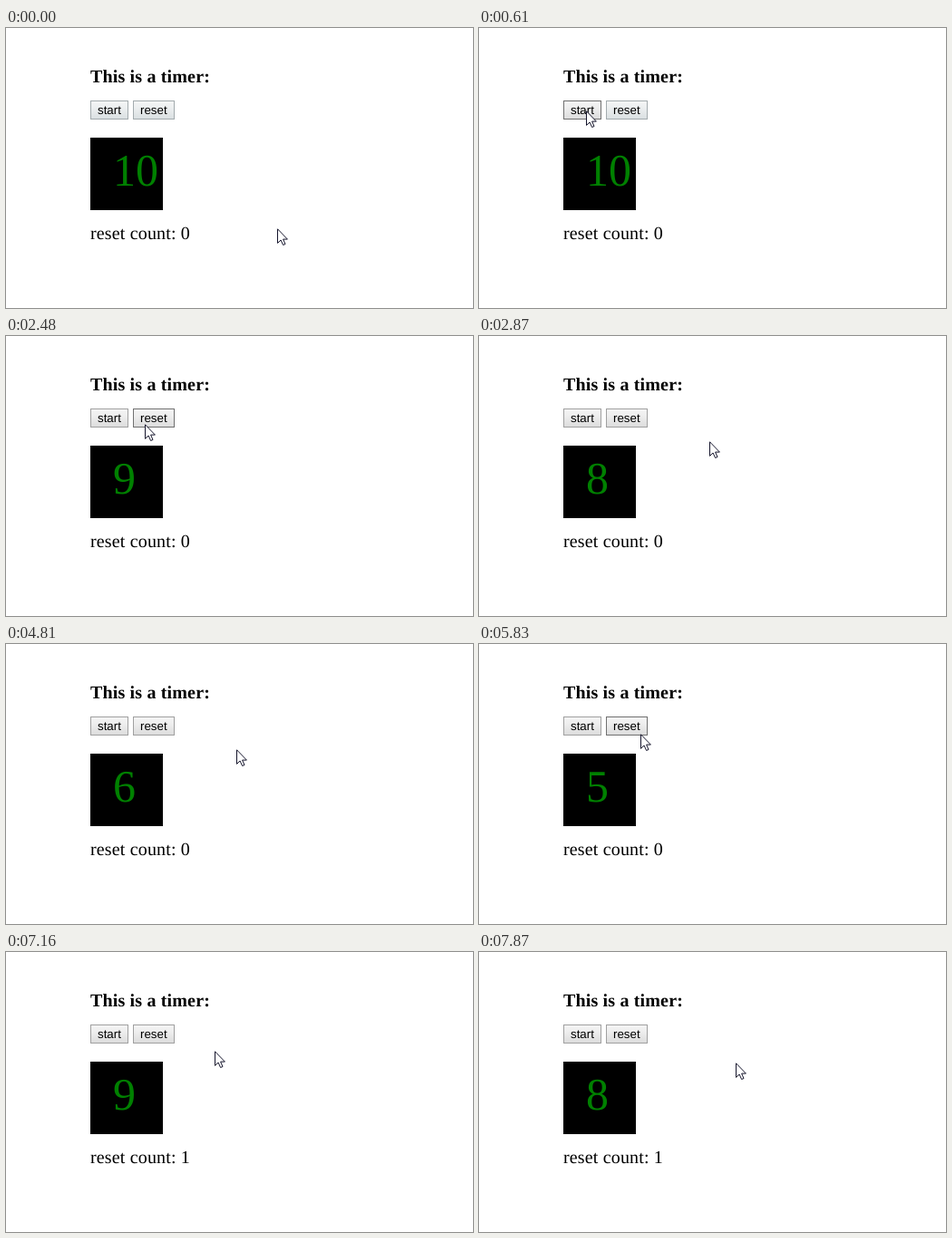
Animation of 515 by 309 pixels, one loop 8 s. Source, as an HTML page:

```html
<!DOCTYPE html>
<html lang="en">
<head>
<meta charset="utf-8">
<title>Timer</title>
<style>
  html, body { margin: 0; width: 100%; height: 100%; overflow: hidden; background: #fff; }
  svg { display: block; width: 515px; height: 309px; }
  text { text-rendering: geometricPrecision; white-space: pre; }
  .serif { font: 20px "Liberation Serif", "Times New Roman", serif; letter-spacing: .16px; }
  .bold { font-weight: bold; }
  .digits { font: 50px "Liberation Serif", "Times New Roman", serif; fill: #008000; }
  .label { font: 13.333px "Liberation Sans", Arial, sans-serif; }
</style>
</head>
<body>
<svg viewBox="0 0 515 309" xmlns="http://www.w3.org/2000/svg">
  <defs>
    <linearGradient id="cool" x2="0" y2="1">
      <stop offset="0" stop-color="#f4f5f5"/><stop offset=".38" stop-color="#eceff0"/><stop offset="1" stop-color="#d9dfe1"/>
    </linearGradient>
    <linearGradient id="grey" x2="0" y2="1">
      <stop offset="0" stop-color="#f4f4f4"/><stop offset=".38" stop-color="#eeeeee"/><stop offset="1" stop-color="#dcdcdc"/>
    </linearGradient>
    <linearGradient id="down" x2="0" y2="1">
      <stop offset="0" stop-color="#dcdcdc"/><stop offset="1" stop-color="#eeeeee"/>
    </linearGradient>
  </defs>
  <rect width="515" height="309" fill="#fff"/>
  <text class="serif bold" x="93" y="60">This is a timer:</text>
  <rect id="startBox" x="93.5" y="80.5" width="41" height="20"/>
  <text class="label" x="101" y="95">start</text>
  <rect id="resetBox" x="140.5" y="80.5" width="45" height="20"/>
  <text class="label" x="148" y="95">reset</text>
  <rect x="93" y="121" width="80" height="80"/>
  <text class="digits" id="digits" x="118" y="174">10</text>
  <text class="serif" id="resets" x="93" y="233">reset count: 0</text>
  <path id="cursor" d="M.5 .8V16.4L4.1 13L6.6 18.5L9 17.5L6.6 12.1H11.4Z" fill="#fff" stroke="#14142b"/>
</svg>
<script>
  const LOOP = 8000;
  const $ = id => document.getElementById(id);

  // Pointer moves: first step time, last step time, steps, destination
  const home = [299, 221];
  const moves = [
    [70, 609, 8, [118, 91]],
    [2250, 2870, 9, [254, 116]],
    [5280, 5440, 3, [178, 99]],
    [6060, 6140, 2, [176, 95]],
    [7080, 7320, 4, [283, 122]]
  ];

  // Time at which each count appears
  const counts = [[0, 10], [1860, 9], [2870, 8], [3800, 7], [4810, 6],
                  [5830, 5], [6610, 10], [6840, 9], [7870, 8]];

  const buttons = [
    { box: $('startBox'), left: 93, right: 135, press: [690, 770], warm: 530 },
    { box: $('resetBox'), left: 140, right: 186, press: [6530, 6610], warm: 2500 }
  ];

  const ease = u => u * u * (3 - 2 * u);

  function pointer(t) {
    let from = home;
    for (const [begin, end, steps, to] of moves) {
      if (t < begin) break;
      const gap = (end - begin) / (steps - 1);
      const done = Math.min(steps, Math.floor((t - begin) / gap + 1e-6) + 1);
      const u = ease(done / steps);
      if (done < steps) return from.map((v, i) => Math.round(v + (to[i] - v) * u));
      from = to;
    }
    return from;
  }

  function drawButton(b, t, x, y) {
    const over = x >= b.left && x < b.right && y >= 80 && y < 101;
    const down = t >= b.press[0] && t < b.press[1];
    const fresh = t < b.warm && !over;
    b.box.setAttribute('fill', `url(#${down ? 'down' : fresh ? 'cool' : 'grey'})`);
    b.box.setAttribute('stroke', over ? '#707070' : fresh ? '#a3abae' : '#a0a0a0');
  }

  function draw(t) {
    const [x, y] = pointer(t);
    $('cursor').setAttribute('transform', `translate(${x} ${y})`);
    for (const b of buttons) drawButton(b, t, x, y);
    $('digits').textContent = counts.filter(c => c[0] <= t).pop()[1];
    $('resets').textContent = 'reset count: ' + (t < 6610 ? 0 : 1);
  }

  const origin = performance.now();
  function tick() {
    draw((performance.now() - origin) % LOOP);
    requestAnimationFrame(tick);
  }
  tick();
</script>
</body>
</html>
```
